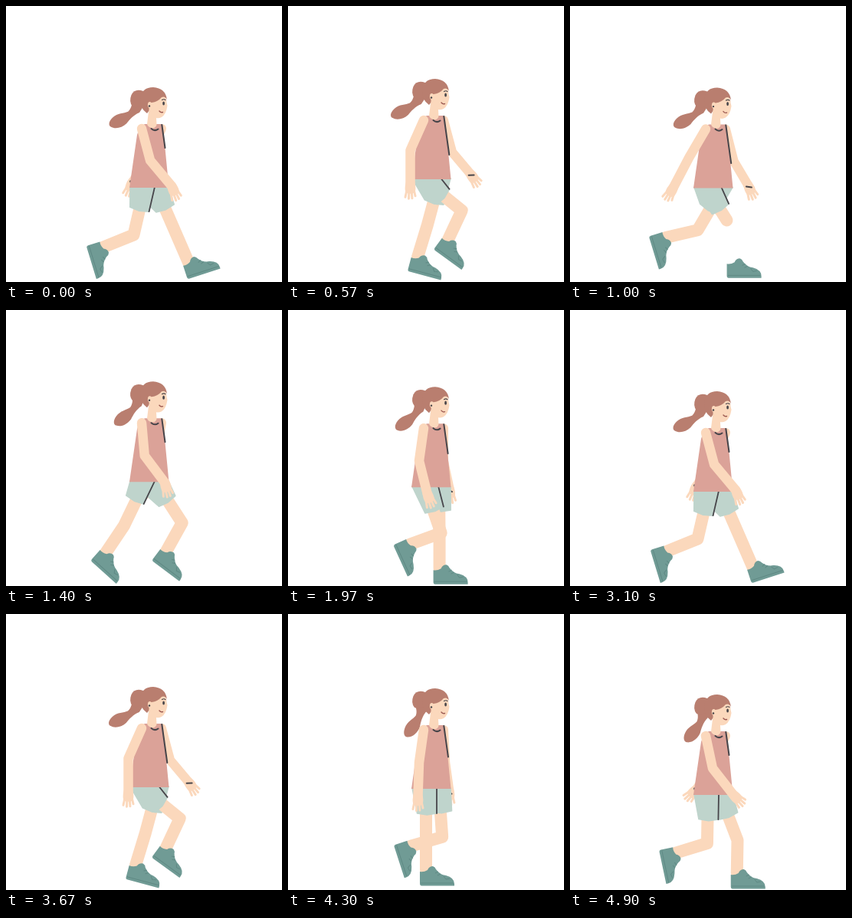
These frames come from a looping animation (360x360 px, 5 s). An HTML page:

```html
<!DOCTYPE html>
<html lang="en">
<head>
<meta charset="utf-8">
<title>Walking</title>
<style>
  html, body { margin: 0; width: 100%; height: 100%; overflow: hidden; background: #fff; }
  svg { display: block; width: 100vw; height: 100vh; }
  .skin { fill: #fbd8bc; }
  .limb { fill: none; stroke: #fbd8bc; stroke-linecap: round; stroke-linejoin: round; }
  .hair { fill: #b97e6f; }
  .shoe { fill: #709b95; }
  .shorts { fill: #bfd4cc; stroke: #bfd4cc; stroke-width: 1.5; stroke-linejoin: round; }
  .top { fill: #dba298; }
  .ink { fill: none; stroke: #47454a; stroke-linecap: round; }
</style>
</head>
<body>
<svg viewBox="0 0 360 360">
  <defs>
    <g id="shoe">
      <path class="shoe" d="M-8 2 Q-3 3 2 0 Q4-5 9-5 Q12-4 13-1 Q18 6 26 7 Q37 10 37 18 V20.5 H-6 Q-8 20 -8 18Z"/>
      <path d="M-7 17 H36 M12 4 L16 2 M15 7 L19 5 M23 8 L26 12 L31 11" fill="none" stroke="#5f8984" stroke-width="1"/>
    </g>
    <g id="hand">
      <path class="skin" d="M-5.5 -3 H5.5 Q8 5 6 11 Q0 14 -6 11 Q-8 5 -5.5 -3Z"/>
      <path class="limb" stroke-width="3" d="M-4.8 9 L-6.5 17 M-1.6 10 L-2 19 M1.8 10 L2.4 18.5 M4.8 8 L6.5 15.5"/>
    </g>
  </defs>
  <g id="farArm">
    <path class="limb" stroke-width="12"/>
    <use href="#hand"/>
    <path class="ink" stroke-width="2"/>
  </g>
  <g id="farLeg"><path class="limb" stroke-width="16"/><use href="#shoe"/></g>
  <path id="farShorts" class="shorts"/>
  <g id="nearLeg"><path class="limb" stroke-width="16"/><use href="#shoe"/></g>
  <path id="nearShorts" class="shorts"/>
  <path id="seam" class="ink" stroke-width="1.8"/>
  <g id="body">
    <path class="top" d="M181 154 H203.5 Q205 156 205.5 165 L212.5 237 H161 L171 168 Q174 157 181 154Z"/>
    <path id="strap" class="ink" stroke-width="2"/>
    <path class="skin" d="M186 121 L204 116 Q210 120 209.5 126 L210.5 130 Q209 141 203 145 Q199 147 196 146 L196.5 155 Q195 160 190 159 Q185 158 184 154 L186 138Z"/>
    <path class="ink" stroke-width="2" d="M189.5 160 Q194 164 198.5 160.5"/>
    <path id="tail" class="hair" d="M-8 -2 C-2 8 2 11 2 18 C0 24 -6 29 -6 38 C-6 46 -2 49 1 48 C8 46 12 38 12 30 C11 24 10 16 13 8 L10 -4Z"/>
    <path class="hair" d="M179 111 Q168 107 163.5 116 Q160 125 165 131 Q171 134 178 129Z"/>
    <path class="hair" d="M210 122 Q208 107 192 106 Q177 106 175 121 Q174 133 184 140 Q188 136 186 131 Q186 126 190 126 Q198 125 203 119 Q207 117 210 122Z"/>
    <ellipse class="skin" cx="187.5" cy="129" rx="2.6" ry="4"/>
    <circle cx="187" cy="130.5" r="1.2" fill="#47454a"/>
    <ellipse cx="205.6" cy="127" rx="1.4" ry="2.6" fill="#47454a"/>
    <path class="ink" stroke-width="1.2" d="M203.5 122.5 Q206 121 208 122.5"/>
    <path fill="none" stroke="#9c5a52" stroke-width="1.4" stroke-linecap="round" d="M200 137 Q202 139.5 204.5 138.5"/>
  </g>
  <g id="nearArm"><path class="limb" stroke-width="12.5"/><use href="#hand"/></g>
</svg>
<script>
const LOOP = 5000, CYCLE = 1550, THIGH = 60, SHIN = 43;
const $ = id => document.getElementById(id);

// Each row: time in the stride, then values (angles from straight down, forward positive).
const farLegKeys = [
  [0, 23.5, 23.5, -18], [110, 34, 6, 0], [250, 21, -1, 0], [425, 0, 0, 0],
  [570, -15, -17, 15], [630, -24, -32, 38], [700, -33, -50, 58], [830, -35, -66, 72],
  [980, -31.6, -77, 73], [1200, 4, -74, 72], [1320, 30, -55, 55], [1400, 33, -29, 37],
  [1490, 26, 18, -13]
];
const nearLegKeys = [
  [0, -13, -68, 73], [100, -22, -82, 78], [250, -1, -73, 78], [425, 20, -70, 65],
  [500, 41, -50, 52], [570, 51, -25, 36], [640, 36, 6, 4], [700, 25, 23, -18],
  [780, 25, 22, -14], [860, 34, 9, -3], [980, 33, 1, 0], [1200, 0, 0, 0],
  [1330, -14, -15, 15], [1400, -25.7, -34, 42], [1470, -26, -48, 58]
];
const nearArmKeys = [
  [0, 15, 40, 22], [110, 17, 46, 36], [250, 12, 38, 45], [420, -8, 14, 20],
  [570, -24, 0, 0], [780, -33, -20, -20], [980, -31, -28, -30], [1200, -8, -2, 0],
  [1400, 5, 37, 15]
];
const farArmKeys = [
  [0, -25, -33, -20], [250, -25, -33, -45], [420, 0, 12, 5], [570, 15, 40, 35],
  [780, 19, 40, 32], [980, 15, 32, 25], [1200, 3, 8, 0], [1400, -10, -12, -5]
];
const bobKeys = [
  [0, 0], [60, 3], [130, 4], [205, 2.5], [250, -1], [425, -6], [570, -11], [640, -9],
  [700, -6], [775, 0], [860, 3.5], [980, 1.2], [1200, -9], [1330, -14], [1400, -12.8], [1480, -7]
];
const tailKeys = [[0, 47], [250, 24], [400, 36], [570, 48], [780, 45], [980, 47], [1200, 20], [1400, 36]];

// Cyclic cubic through the rows without overshoot.
function sample(keys, p) {
  const n = keys.length;
  const row = i => {
    const w = Math.floor(i / n);
    const k = keys[i - w * n];
    return [k[0] + w * CYCLE, ...k.slice(1)];
  };
  let i = n - 1;
  while (keys[i][0] > p) i--;
  const [a, b, c, d] = [row(i - 1), row(i), row(i + 1), row(i + 2)];
  const h = c[0] - b[0], u = (p - b[0]) / h;
  return b.slice(1).map((v, j) => {
    const slope = (x, y) => (y[j + 1] - x[j + 1]) / (y[0] - x[0]);
    const soft = (x, y) => x * y > 0 ? 2 * x * y / (x + y) : 0;
    const m = slope(b, c), m0 = soft(slope(a, b), m), m1 = soft(m, slope(c, d));
    const e = c[j + 1] - v;
    return v + h * m0 * u + (3 * e - h * (2 * m0 + m1)) * u * u + (h * (m0 + m1) - 2 * e) * u * u * u;
  });
}

const rad = a => a * Math.PI / 180;
const reach = ([x, y], a, len) => [x + len * Math.sin(rad(a)), y + len * Math.cos(rad(a))];
const line = (...pts) => 'M' + pts.map(p => p.map(v => v.toFixed(2)).join(' ')).join('L');
const place = (el, [x, y], a) => el.setAttribute('transform', `translate(${x} ${y}) rotate(${a})`);

function leg(g, hip, [thigh, shin, foot], hideShin) {
  const knee = reach(hip, thigh, THIGH), ankle = reach(knee, shin, SHIN);
  const pts = hideShin ? [hip, reach(hip, thigh, 46)] : [hip, knee, ankle];
  g.children[0].setAttribute('d', line(...pts));
  place(g.children[1], ankle, foot);
}

function arm(g, shoulder, [upper, fore, hand], foreLen) {
  const elbow = reach(shoulder, upper, 43), wrist = reach(elbow, fore, foreLen);
  g.children[0].setAttribute('d', line(shoulder, elbow, wrist));
  place(g.children[1], wrist, -hand);
  return wrist;
}

// One trouser leg; returns its front edge.
function shorts(el, left, front, angle, len) {
  const a = angle > 0 ? angle * 0.75 : angle;
  const end = reach(front, a, len);
  const back = reach(end, angle - 90, 25.5);
  const mid = reach([(end[0] + back[0]) / 2, (end[1] + back[1]) / 2], angle, 2);
  el.setAttribute('d', line(left, front, end, mid, back) + 'Z');
  return [front, end];
}

function draw(t) {
  const p = t % CYCLE;
  const [dy] = sample(bobKeys, p);
  const far = sample(farLegKeys, p), near = sample(nearLegKeys, p);
  const farArm = sample(farArmKeys, p);
  const waist = 236 + dy;

  const wrist = arm($('farArm'), [203, 160 + dy], farArm, 37);
  $('farArm').children[2].setAttribute('d',
    line(reach(wrist, farArm[1] - 90, 3), reach(wrist, farArm[1] + 30, 5)));

  leg($('farLeg'), [197, 240 + dy], far);
  leg($('nearLeg'), [180, 240 + dy], near, p > 950 && p < 1010);

  shorts($('farShorts'), [162, waist], [212, waist], far[0], 31 - 0.3 * far[0]);
  const bend = Math.max(0, near[0]);
  const edge = shorts($('nearShorts'), [162, waist], [194 + 0.11 * bend, waist], near[0], 33 - 0.3 * bend);
  $('seam').setAttribute('d', line(...edge));

  $('body').setAttribute('transform', `translate(0 ${dy})`);
  const drop = Math.min(50, 38 + Math.max(-10, farArm[0]) * 0.8);
  $('strap').setAttribute('d', line([203.3, 155], [203.3 + drop * 0.14, 155 + drop]));
  place($('tail'), [171, 124], sample(tailKeys, p)[0]);
  arm($('nearArm'), [177, 160 + dy], sample(nearArmKeys, p), 44);
}

// Poses are held: ten per 700 ms, the first a little longer.
function hold(t) {
  const base = Math.floor(t / 700) * 700;
  let start = 0;
  for (let i = 0; i < 9; i++) {
    const s = Math.round((100 + i * 200 / 3) / 10) * 10;
    if (base + s <= t) start = s;
  }
  return base + start;
}

const begin = performance.now();
function tick() {
  draw(hold((performance.now() - begin) % LOOP));
  requestAnimationFrame(tick);
}
tick();
</script>
</body>
</html>
```
